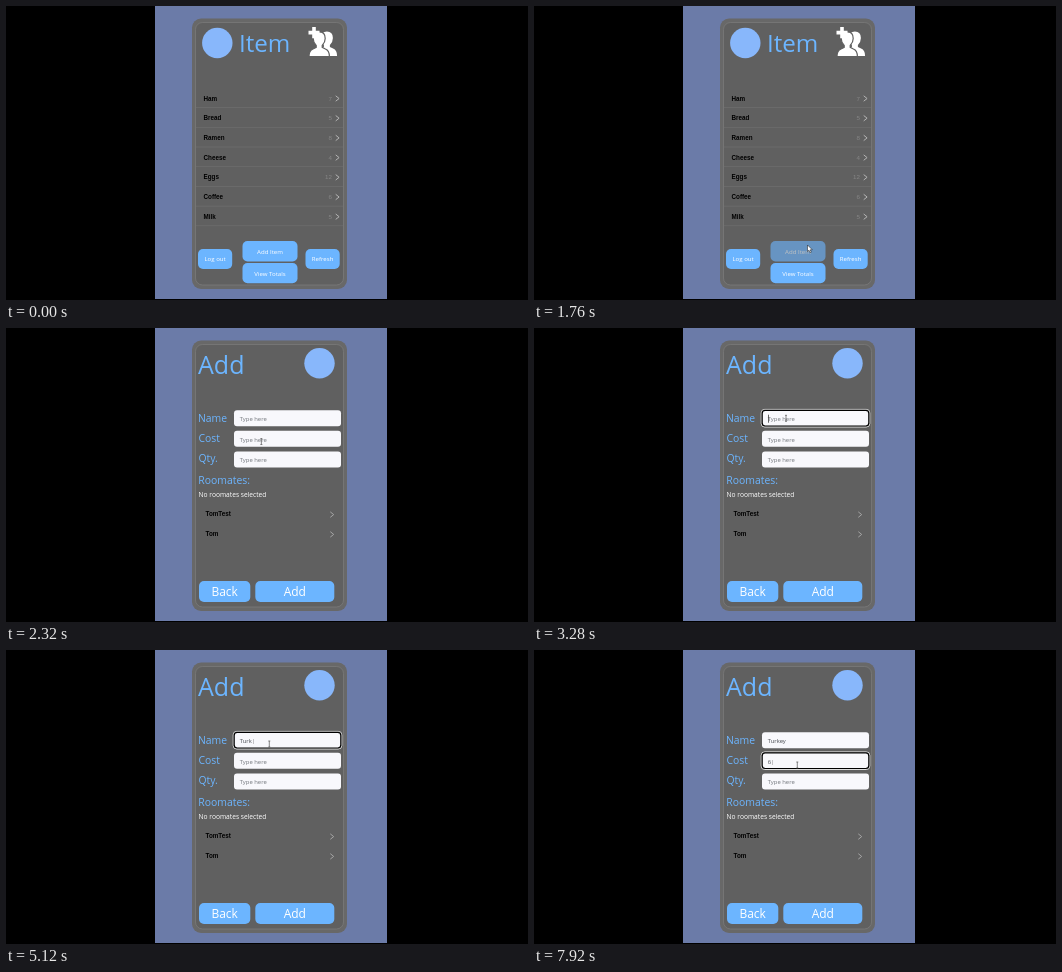
An HTML page for the animation above (8000 ms loop, 522 by 294 pixels).

```html
<!DOCTYPE html>
<html lang="en">
<head>
<meta charset="utf-8">
<title>Shopping list</title>
<style>
  html, body { margin: 0; width: 100%; height: 100%; overflow: hidden; background: #000; }
  svg { display: block; width: 100vw; height: 100vh; font-family: "Open Sans", "Noto Sans", sans-serif; }
  .row { font: bold 6.3px "Liberation Sans", Arial, sans-serif; }
  .qty { font: 6.2px "Liberation Sans", Arial, sans-serif; fill: #868686; text-anchor: end; }
  .btn { fill: #fff; text-anchor: middle; }
</style>
</head>
<body>
<svg id="stage" viewBox="0 0 522 294"></svg>
<script>
const LOOP = 8000, STEP = 80;
const BLUE = '#6cb5ff', GREY = '#606060';
const stage = document.getElementById('stage');

const rect = (x, y, w, h, r, fill, extra = '') =>
  `<rect x="${x}" y="${y}" width="${w}" height="${h}" rx="${r}" fill="${fill}" ${extra}/>`;
const text = (x, y, size, fill, str) =>
  `<text x="${x}" y="${y}" font-size="${size}" fill="${fill}">${str}</text>`;
const row = (x, y, str) => `<text class="row" x="${x}" y="${y}">${str}</text>`;
const button = (x, y, w, h, size, str, opacity = 1) =>
  `<g opacity="${opacity}">${rect(x, y, w, h, 5, BLUE)}
   <text class="btn" x="${x + w / 2}" y="${y + h / 2 + size * .39}" font-size="${size}">${str}</text></g>`;
const chevron = (x, y, color) =>
  `<path d="M${x} ${y - 2.7}l3.4 2.7l-3.4 2.7" fill="none" stroke="${color}"/>`;
const badge = (x, y) => `<circle cx="${x}" cy="${y}" r="15.2" fill="#88b7fb"/>`;

const frame = rect(149, 0, 232, 293, 0, '#6b7ba8') +
  rect(186, 12.5, 155, 270.5, 9, '#686868') +
  rect(189.5, 16.5, 148, 262.5, 7, GREY, 'stroke="#7a7a7a" stroke-width=".8"');

const person = (x, y) =>
  `<path d="M${x - 10.3} ${y + 18}q0-6 4-7.5l3.2-1.6v-2q-3-3-3-7q0-6.5 6-6.5t6 6.5q0 4-3 7v2l3.2 1.6q4 1.5 4 7.5z"/>`;
const addUser = `<g fill="#fff">${person(321, 32)}
  <g stroke="${GREY}" stroke-width="1.2">${person(313.3, 32.5)}</g>
  <path d="M306.2 21h3.6v3.8h3.7v3.6h-3.7v3.8h-3.6v-3.8h-3.7v-3.6h3.7z"/></g>`;

const items = [['Ham', 7], ['Bread', 5], ['Ramen', 8], ['Cheese', 4], ['Eggs', 12], ['Coffee', 6], ['Milk', 5]];

function listPage(t) {
  const rows = items.map(([name, qty], i) => {
    const y = 92.3 + i * 19.7;
    return row(197.5, y + 2.2, name) +
      `<text class="qty" x="326" y="${y + 2.2}">${qty}</text>` +
      chevron(329.7, y + .2, '#b4b4b4') +
      rect(190, y + 9, 147, .6, 0, '#717171');
  });
  return badge(211.3, 37) + text(233, 46, 24.2, BLUE, 'Item') + addUser + rows.join('') +
    button(192, 243, 34.2, 20, 6.1, 'Log out') +
    button(236.5, 235, 55, 20.5, 6.1, 'Add Item', t >= 1760 ? .62 : 1) +
    button(236.5, 257, 55, 20.3, 6.1, 'View Totals') +
    button(299.5, 243, 34.2, 20, 6.1, 'Refresh');
}

// Typed values: [time, text]
const nameKeys = [[0, ''], [4000, 'T'], [4160, 'Tu'], [4240, 'Tuk'], [4880, 'Tu'], [4960, 'Tur'],
  [5120, 'Turk'], [5600, 'Turke'], [5680, 'Turkey']];
const costKeys = [[0, ''], [7840, '6']];
const caretOn = [[3120, 3600], [4000, 4720], [4880, 6240], [6800, 7280], [7760, LOOP]];

const typed = (keys, t) => keys.filter(k => k[0] <= t).pop()[1];
const clamp = v => v < 0 ? 0 : v > 1 ? 1 : v;

function field(y, value, focus, caret) {
  const ring = focus ? `<g opacity="${focus}">
    ${rect(227.2, y - .8, 108.6, 17.6, 3.5, 'none', 'stroke="#fff" stroke-width=".8"')}
    ${rect(228.2, y + .2, 106.6, 15.6, 3, 'none', 'stroke="#000" stroke-width="1.2"')}</g>` : '';
  const mark = caret ? '<tspan fill="#222" font-weight="300" dx=".1">|</tspan>' : '';
  const body = value
    ? text(233.7, y + 10.9, 5.9, '#484c52', value + mark)
    : text(233.7, y + 10.9, 5.9, '#74787e', 'Type here') +
      (caret ? rect(234, y + 4.5, .7, 8, 0, '#222') : '');
  return rect(228, y, 107, 16, 3, '#f8f8fc') + ring + body;
}

function addPage(t) {
  const caret = caretOn.some(([a, b]) => t >= a && t < b);
  const onCost = t >= 6720;
  const nameFocus = onCost ? clamp((6800 - t) / 160) : clamp((t - 2880) / 240);
  const costFocus = clamp((t - 6640) / 160);
  return text(192, 46, 25, BLUE, 'Add') + (t >= 1920 ? badge(313.5, 35.3) : '') +
    text(192, 94, 10.4, BLUE, 'Name') + text(192.5, 113.8, 10.4, BLUE, 'Cost') +
    text(192.5, 133.8, 10.4, BLUE, 'Qty.') + text(192.3, 155.6, 10.4, BLUE, 'Roomates:') +
    text(192.6, 169, 6.65, '#fff', 'No roomates selected') +
    field(82.2, typed(nameKeys, t), nameFocus, caret && !onCost) +
    field(102.7, typed(costKeys, t), costFocus, caret && onCost) +
    field(123.5, '', 0, false) +
    row(199.5, 188.4, 'TomTest') + row(199.5, 208.2, 'Tom') +
    chevron(324.3, 186.6, '#a4a4a4') + chevron(324.3, 206.4, '#a4a4a4') +
    button(193, 253, 51.3, 21, 12, 'Back') + button(249.3, 253, 79, 21, 12, 'Add');
}

// Pointer path: [time, x, y]
const path = [[560, 204, 171], [800, 281, 253], [960, 273.5, 239], [1840, 273.5, 239], [2480, 252, 90.3],
  [3280, 252, 90.3], [3600, 263.3, 94], [6400, 263.3, 94], [6560, 263.3, 100], [6640, 263.3, 100],
  [6720, 263.3, 105.5], [7680, 263.3, 105.5], [7920, 263.3, 115], [LOOP, 263.3, 115]];

function pointer(t) {
  if (t < path[0][0]) return '';
  const i = path.findIndex(p => p[0] > t);
  const [t0, x0, y0] = path[i - 1], [t1, x1, y1] = path[i];
  const k = (t - t0) / (t1 - t0), e = k * k * (3 - 2 * k);
  const x = x0 + (x1 - x0) * e, y = y0 + (y1 - y0) * e;
  return t >= 1840 && y < 140
    ? `<path d="M${x - 1} ${y - 3}h2m-1 0v6m-1 0h2" fill="none" stroke="#555" stroke-width=".7"/>`
    : `<path d="M${x} ${y}v6.6l1.5-1.4l1.1 2.5l1.2-.5l-1.1-2.4h2.1z" fill="#fff" stroke="#111" stroke-width=".5"/>`;
}

let last = -1;
function draw(now) {
  const t = Math.floor(now % LOOP / STEP) * STEP;
  if (t !== last) {
    stage.innerHTML = frame + (t < 1840 ? listPage(t) : addPage(t)) + pointer(t);
    last = t;
  }
  requestAnimationFrame(draw);
}
draw(0);
</script>
</body>
</html>
```
